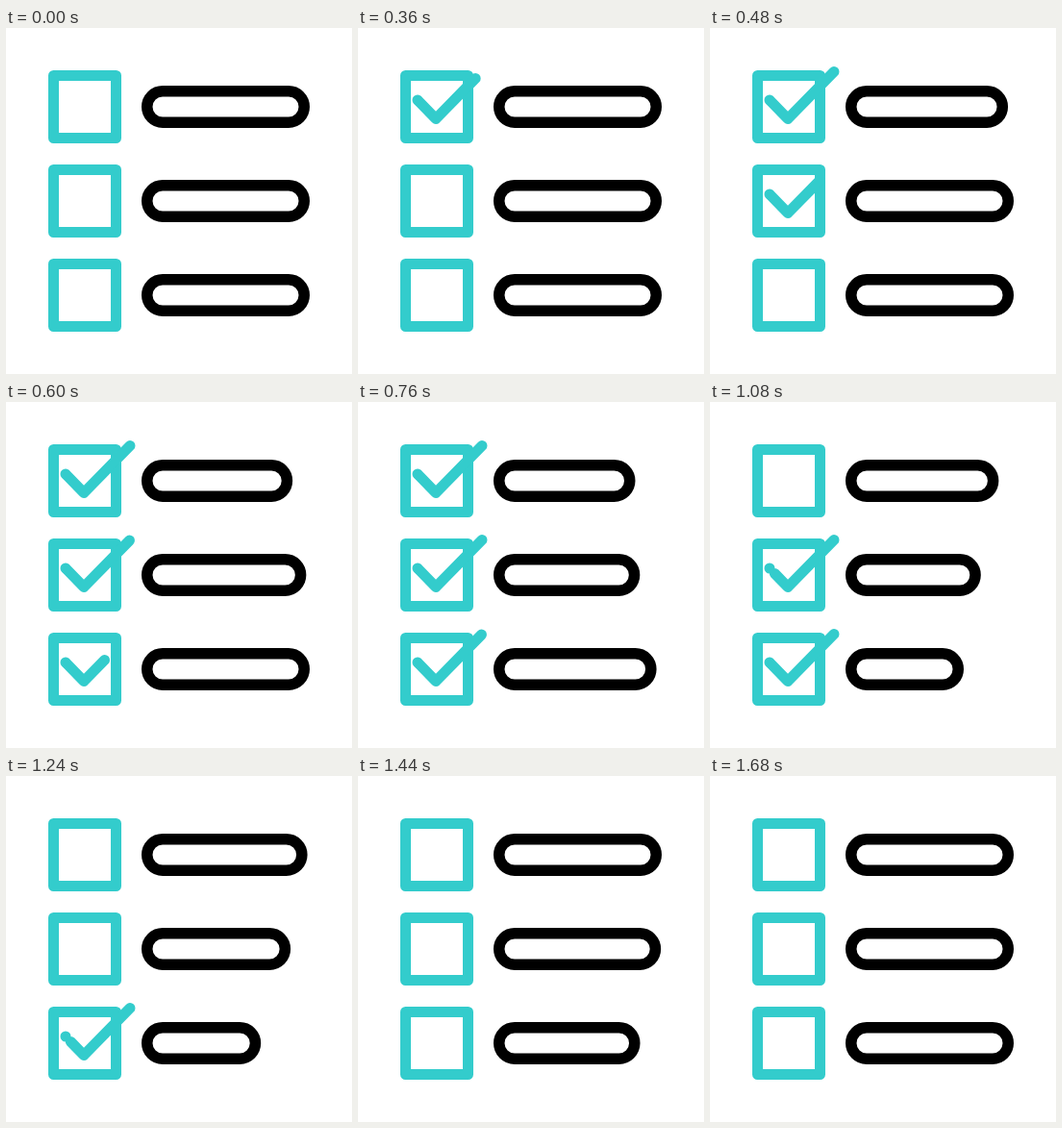
Recreate the animation shown at these times as an HTML page. Size 360x360 px, loop 2000 ms.

```html
<!DOCTYPE html>
<html lang="en">
<head>
<meta charset="utf-8">
<title>Checklist</title>
<style>
  html, body { margin: 0; height: 100%; overflow: hidden; background: #fff; }
  svg { display: block; width: 100vw; height: 100vh; }
  svg * { fill: none; stroke-width: 11; stroke-linecap: round; stroke-linejoin: round; }
  .box, .check { stroke: #33cccc; }
  .bar { stroke: #000; stroke-width: 11.5; }
</style>
</head>
<body>
<svg id="stage" viewBox="0 0 360 360"></svg>
<script>
const LOOP = 2000, STEP = 40, STAGGER = 160;
const BAR_WIDTH = 163.5;
const stage = document.getElementById('stage');

const progress = (t, from, to) => Math.min(1, Math.max(0, (t - from) / (to - from)));
const easeIn = p => p ** 3;
const easeOut = p => 1 - (1 - p) ** 3;
const smooth = p => p * p * (3 - 2 * p);

function add(parent, tag, attrs) {
  const el = document.createElementNS('http://www.w3.org/2000/svg', tag);
  for (const name in attrs) el.setAttribute(name, attrs[name]);
  return parent.appendChild(el);
}

const rows = [27.5, 35, 52].map((shrink, i) => {
  const g = add(stage, 'g', { transform: `translate(0 ${82 + 98 * i})` });
  add(g, 'rect', { class: 'box', x: 49.5, y: -32.5, width: 65, height: 65 });
  const check = add(g, 'path', { class: 'check', d: 'M62-7 81 12.5 129-36.5' });
  const bar = add(g, 'rect', { class: 'bar', x: 146.75, y: -16.25, width: BAR_WIDTH, height: 32.5, rx: 16.25 });
  return { check, bar, shrink, length: check.getTotalLength(), delay: i * STAGGER };
});

function draw(time) {
  for (const { check, bar, shrink, length, delay } of rows) {
    const t = time - delay;
    const tail = easeIn(progress(t, 800, 1080)) * length;
    const head = easeOut(progress(t, 200, 500)) * length;
    check.style.display = head > tail ? '' : 'none';
    check.setAttribute('stroke-dasharray', `0 ${tail} ${head - tail} ${length * 2}`);

    const squeeze = smooth(progress(t, 360, 760)) - smooth(progress(t, 880, 1320));
    bar.setAttribute('width', BAR_WIDTH - shrink * squeeze);
  }
}

const start = performance.now();
function tick() {
  const time = (performance.now() - start) % LOOP;
  draw(Math.floor(time / STEP) * STEP);
  requestAnimationFrame(tick);
}
tick();
</script>
</body>
</html>
```
